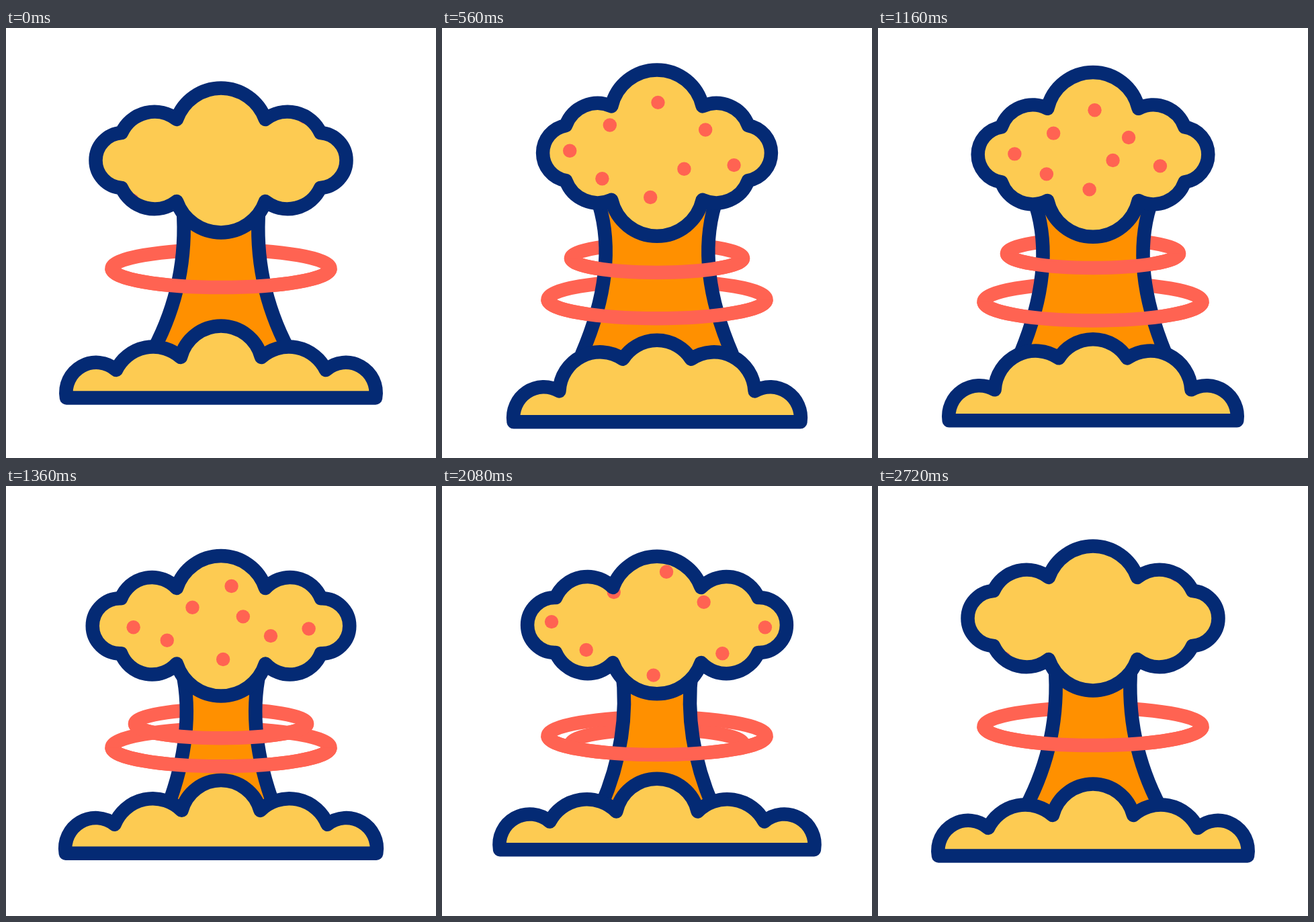
These frames come from a looping animation (640 px wide and 640 px high, 3 s). An HTML page with a canvas:

```html
<!DOCTYPE html>
<html>
<head>
<meta charset="utf-8">
<title>Mushroom cloud</title>
<style>
  html, body { margin: 0; width: 100%; height: 100%; overflow: hidden; background: #fff; }
  canvas { display: block; }
</style>
</head>
<body>
<canvas id="stage" width="640" height="640"></canvas>
<script>
const ctx = document.getElementById('stage').getContext('2d');
const LOOP = 3000, MID = 320, LINE = 20.5, TURN = Math.PI * 2;
const NAVY = '#042a74', YELLOW = '#fdcb52', ORANGE = '#ff9000', RED = '#ff6352';

// Key poses, left half only; everything is mirrored around MID.
// cap: centre y, inner notch dx dy, outer notch dx, bulge of crown, shoulder, side
// ground: x, y and bulge of each puff; stem: top, bend, foot; rings: y of wide, small
const POSES = {
  rest: {
    cap: [197, 66, 61, 148, 46.5, 20.3, 38.5],
    ground: [90, 550.5, 30, 164, 509, 24.3, 260, 490, 46.5],
    stem: [263.5, 268, 272, 379, 220, 478],
    rings: [358, 414]
  },
  tall: {
    cap: [184.5, 68, 71, 134, 55, 15.5, 33.5],
    ground: [109, 591.5, 25, 176, 545, 32, 270.5, 493, 25],
    stem: [229.5, 262, 261, 356, 206.5, 486],
    rings: [411, 332]
  },
  squat: {
    cap: [215, 65.5, 52, 153, 46, 25.5, 45],
    ground: [83, 534, 30, 157.5, 492, 26, 259, 480, 50.5],
    stem: [272, 280, 288, 370, 250, 476],
    rings: [383, 360]
  }
};

// Clockwise from the top: place in the tall pose, place in the squat pose.
const SPARKS = [
  [320, 117, 340, 158], [377, 157, 346, 205], [414, 204, 461, 215], [341, 192, 409, 232],
  [313, 237, 326, 264], [253, 215, 236, 234], [206, 183, 185, 218], [258, 152, 283, 189]
];

// Slow start, fast middle and a long tail.
function ease(x) {
  if (x <= 0) return 0;
  if (x >= 1) return 1;
  let lo = 0, hi = 1, u;
  for (let i = 0; i < 24; i++) {
    u = (lo + hi) / 2;
    const v = 1 - u;
    if (1.5 * v * v * u + 0.21 * v * u * u + u * u * u < x) lo = u; else hi = u;
  }
  return u * u * (3 - 2 * u);
}

// Weights of rest, tall and squat at a time.
function weightsAt(t, start) {
  const rise = ease((t - start) / (980 - start));
  const sink = ease((t - 980) / 820);
  const settle = ease((t - 1800) / 870);
  return [1 - rise + settle, rise - sink, sink - settle];
}

const mix = (a, b, c, w) => a * w[0] + b * w[1] + c * w[2];

const pose = (part, w) => POSES.rest[part].map((v, i) =>
  mix(v, POSES.tall[part][i], POSES.squat[part][i], w));

// Closed outline of [x, y, bulge of the arc to the next point].
function lobes(points) {
  let d = `M${points[0][0]} ${points[0][1]}`;
  points.forEach(([x, y, h], i) => {
    const [nx, ny] = points[(i + 1) % points.length];
    const half = Math.hypot(nx - x, ny - y) / 2;
    const r = (half * half + h * h) / (2 * h);
    d += h ? `A${r} ${r} 0 ${h > half ? 1 : 0} 1 ${nx} ${ny}` : `L${nx} ${ny}`;
  });
  return new Path2D(d + 'Z');
}

function capPath([cy, dx, dy, outer, crown, shoulder, side]) {
  const half = s => [
    [MID - s * dx, cy - s * dy, crown],
    [MID + s * dx, cy - s * dy, shoulder],
    [MID + s * outer, cy - s * 41, side],
    [MID + s * outer, cy + s * 41, shoulder]
  ];
  return lobes([...half(1), ...half(-1)]);
}

function groundPath([x0, y0, h0, x1, y1, h1, x2, y2, h2]) {
  const m = x => 2 * MID - x;
  return lobes([[x0, y0, h0], [x1, y1, h1], [x2, y2, h2],
    [m(x2), y2, h1], [m(x1), y1, h0], [m(x0), y0, 0]]);
}

function fill(path, color) {
  ctx.fillStyle = color;
  ctx.fill(path);
}

function stroke(path, color = NAVY) {
  ctx.strokeStyle = color;
  ctx.stroke(path);
}

function drawStem([x0, y0, x1, y1, x2, y2]) {
  const m = x => 2 * MID - x;
  const left = `M${x0} ${y0}Q${x1} ${y1} ${x2} ${y2}`;
  const right = `${m(x2)} ${y2}Q${m(x1)} ${y1} ${m(x0)} ${y0}`;
  fill(new Path2D(`${left}L${right}Z`), ORANGE);
  stroke(new Path2D(`${left}M${right}`));
}

// The small ring sinks out of sight behind the front of the wide one.
function drawRings([wideY, smallY], sweep) {
  const ring = (y, rx, ry) => {
    const path = new Path2D();
    path.ellipse(MID, y, rx, ry, 0, 0, sweep);
    stroke(path, RED);
  };
  ctx.save();
  ctx.lineCap = 'butt';
  ctx.save();
  const above = new Path2D();
  above.rect(0, 0, 640, wideY);
  above.ellipse(MID, wideY, 172, 38, 0, 0, Math.PI);
  ctx.clip(above);
  ring(smallY, 128, 21.5);
  ctx.restore();
  ring(wideY, 162.5, 28);
  ctx.restore();
}

// At rest the sparks sit under the cap's outline, evenly spread around it.
function drawSparks(w) {
  SPARKS.forEach(([tx, ty, sx, sy], i) => {
    const angle = (i * 46 - 88) * Math.PI / 180, reach = i % 2 ? 0.9 : 1;
    const x = mix(MID + 186.5 * reach * Math.cos(angle), tx, sx, w);
    const y = mix(197 + 107.5 * reach * Math.sin(angle), ty, sy, w);
    const dot = new Path2D();
    dot.arc(x, y, 10.2, 0, TURN);
    fill(dot, RED);
  });
}

function draw(t) {
  const w = weightsAt(t, 40);
  const rings = pose('rings', w);
  const ground = groundPath(pose('ground', w));
  const cap = capPath(pose('cap', w));

  ctx.clearRect(0, 0, 640, 640);
  ctx.lineWidth = LINE;
  ctx.lineJoin = ctx.lineCap = 'round';

  drawRings(rings, TURN);
  drawStem(pose('stem', w));
  drawRings(rings, Math.PI);

  fill(ground, YELLOW);
  stroke(ground);

  fill(cap, YELLOW);
  ctx.save();
  ctx.clip(cap);
  drawSparks(weightsAt(t, 200));
  ctx.restore();
  stroke(cap);
}

function tick() {
  draw(performance.now() % LOOP);
  requestAnimationFrame(tick);
}
tick();
</script>
</body>
</html>
```
